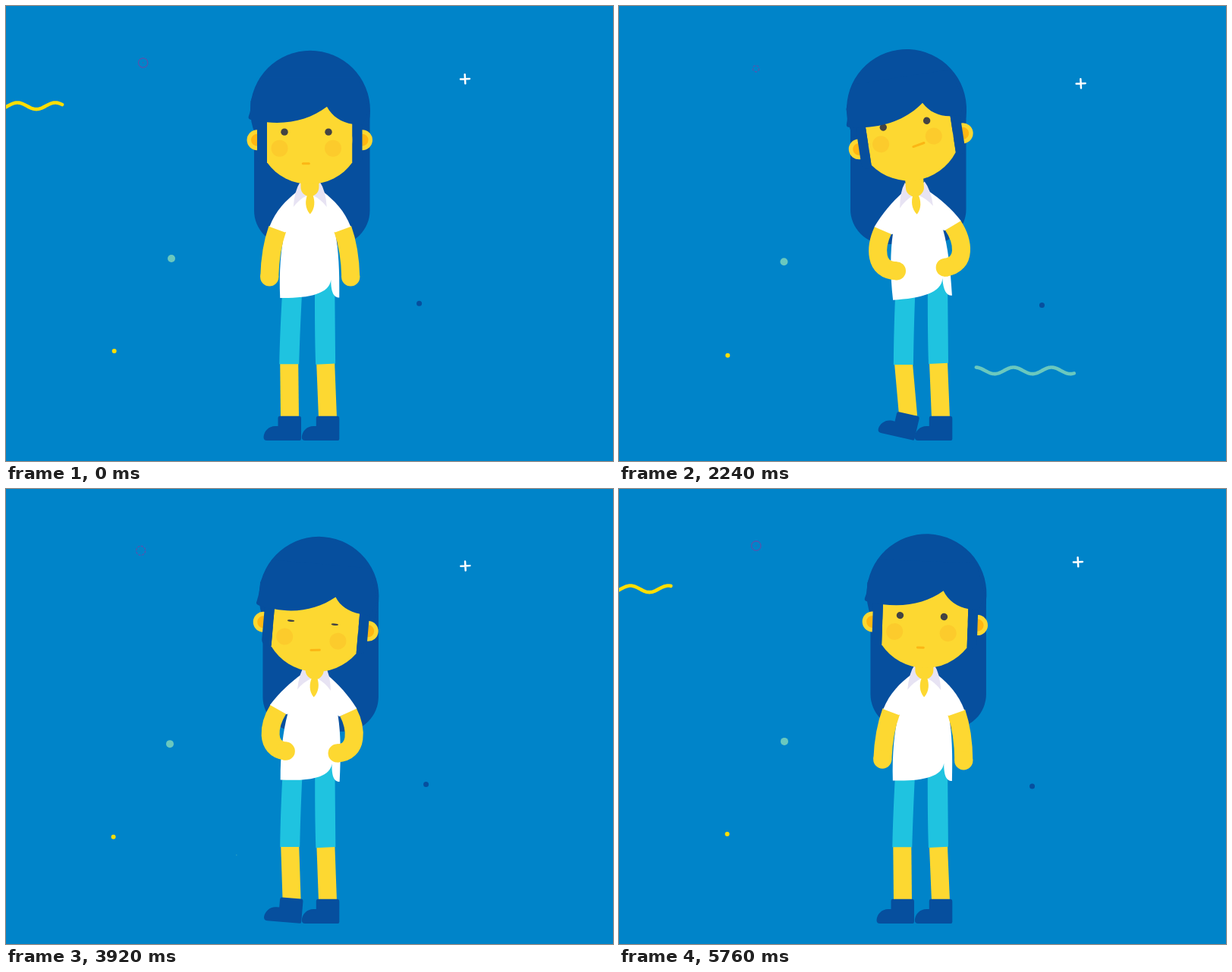
Animation, 800 px wide and 600 px high, one loop 5.8 s. Source, as an HTML page with a canvas:

```html
<!DOCTYPE html>
<html lang="en">
<head>
<meta charset="utf-8">
<title>Waiting girl</title>
<style>
html, body { margin: 0; width: 100%; height: 100%; overflow: hidden; background: #0084c9; }
canvas { display: block; width: 100vw; height: 100vh; }
</style>
</head>
<body>
<canvas id="stage" width="800" height="600"></canvas>
<script>
const ctx = document.getElementById('stage').getContext('2d');
const LOOP = 5800, STEP = 40;
const BLUE = '#0084c9', NAVY = '#064f9e', SKIN = '#fdd831', PANTS = '#1fc3e0',
      WHITE = '#fff', COLLAR = '#e7e3f3', ORANGE = '#ffb612', CHEEK = '#fccb2c',
      MOUTH = '#fbb615', EYE = '#434343', TEAL = '#6ac8be', YELLOW = '#ffde00', PURPLE = '#6a4aa8';

// ---- motion ----
const clamp = u => Math.min(1, Math.max(0, u));
const mix = (a, b, u) => a + (b - a) * u;
const inOut = u => u < .5 ? 4 * u ** 3 : 1 - 4 * (1 - u) ** 3;
const ramp = (t, start, length) => inOut(clamp((t - start) / length));
// Goes up to 1 and later back to 0
const pulse = (t, on, onLength, off, offLength) => ramp(t, on, onLength) - ramp(t, off, offLength);
const sway = (t, mid, amp, peak, period = LOOP) => mid + amp * Math.cos((t - peak) / period * 2 * Math.PI);

// Time runs from -550 to 5250, so the swing across the loop seam is one move
function poseAt(t) {
  const left = pulse(t, -500, 1000, 3540, 610);
  const stand = pulse(t, -500, 1000, 3560, 790);
  const lift = pulse(t, -500, 850, 3540, 460);
  const gaze = pulse(t, -500, 1100, 3540, 610);
  const sulk = pulse(t, 50, 650, 3540, 760);
  const tap = pulse(t, 1300, 650, 3560, 690);
  const look = pulse(t, 2350, 550, 3560, 690);
  const calm = pulse(t, -500, 600, 2350, 550);
  const lean = 1 - 2 * left, sink = 2 * (tap - look);
  return {
    left, lean,
    shift: 3.5 * stand - 1.5 - sink,
    headX: 401 + 20 * lean - sink,
    headY: 142 - 6 * lift,
    nod: 3.4 - 11.8 * gaze - 2 * tap + 12.3 * look,
    ears: 3.7 * sulk - 2.7 * look,
    fringe: 6 * (1 - calm),
    pout: .85 * sulk + .15 * tap,
    bend: 1 - pulse(t, -500, 440, 20, 480),
    hands: 3.5 * tap,
    foot: 13 * tap - 2 * look,
    lids: 1 - .73 * pulse(t, 3780, 120, 3940, 120)
  };
}

// ---- drawing helpers ----
function shape(d, color) {
  ctx.fillStyle = color;
  ctx.fill(new Path2D(d));
}
function line(d, color, width, cap = 'round') {
  ctx.strokeStyle = color;
  ctx.lineWidth = width;
  ctx.lineCap = cap;
  ctx.stroke(new Path2D(d));
}
function disc(x, y, rx, color, ry = rx) {
  ctx.fillStyle = color;
  ctx.beginPath();
  ctx.ellipse(x, y, rx, ry, 0, 0, 7);
  ctx.fill();
}
function box(x, y, w, h, r, color) {
  ctx.fillStyle = color;
  ctx.beginPath();
  ctx.roundRect(x, y, w, h, r);
  ctx.fill();
}
// Puts the pivot (px, py) of a part at (x, y) and turns it there
function group(draw, x, y, angle = 0, px = 0, py = 0) {
  ctx.save();
  ctx.translate(x, y);
  ctx.rotate(angle * Math.PI / 180);
  ctx.translate(-px, -py);
  draw();
  ctx.restore();
}
// Draws once as is and once mirrored about the body axis
function bothSides(draw) {
  draw();
  ctx.save();
  ctx.translate(801, 0);
  ctx.scale(-1, 1);
  draw();
  ctx.restore();
}

// ---- scene ----
function squiggle(from, to, mid, crest, color) {
  if (to < from) return;
  const y = x => mid - 4.3 * Math.cos((x - crest) * Math.PI / 25);
  let d = `M${from},${y(from)}`;
  for (let x = from + 1; x < to; x++) d += `L${x},${y(x)}`;
  line(d + `L${to},${y(to)}`, color, Math.min(4.6, to - from + 1));
}

function drawWaves(t) {
  const y = (t + 520) / 1840;
  if (y > 0 && y < 1) squiggle(.162 * t - 9, 198 - 204 * (1 - y) ** 1.5, 131.8, 15, YELLOW);

  const g = (t - 640) / 3290;
  if (g > 0 && g < 1) {
    const tip = 794 - 491 * g ** .58;
    const length = 129 * (1 - clamp((t - 2240) / 1690)) ** 4;
    squiggle(tip, Math.min(794, tip + length), 480.8, 20, TEAL);
  }
}

function drawDecor(t) {
  drawWaves(t);
  disc(sway(t, 217.3, 1.3, 900), sway(t, 335.3, 2.4, 2800), 5, TEAL);
  disc(sway(t, 142.6, 1.1, 1400), sway(t, 458, 3.1, 2700), 3, YELLOW);
  disc(sway(t, 551.5, 7, 2750), sway(t, 392.3, 3.2, 1500), 3.5, NAVY);
  group(() => line('M-6,0H6M0,-6V6', WHITE, 2.5), sway(t, 606.4, 2.3, 2050), sway(t, 99.7, 3.5, 2950), -3);

  group(() => {
    ctx.globalAlpha = .8;
    ctx.setLineDash([3.2, sway(t, 1, 1, 2900)]);
    const r = sway(t, 5.4, 1.3, 4900);
    line(`M${r},0A${r},${r} 0 1 1 ${-r},0A${r},${r} 0 1 1 ${r},0`, PURPLE, 1.3, 'butt');
    if (Math.abs(t) < 200) disc(0, 0, .8, PURPLE);
  }, sway(t, 179.3, 1.7, 2600, LOOP / 2), sway(t, 79.3, 4.4, 2900));
}

const BOOT = 'M361,540.7H386Q389,540.7 389,544V571Q389,573 387,573H344Q339.5,573 339.5,568.5' +
             'C340,561 346,554 355,554H358.5V543.5Q358.5,540.7 361,540.7Z';

function drawLegs(p) {
  const hip = p.shift * .5;
  const kneeL = 373.2 + p.foot * .16 + p.lean * .4, kneeR = 421 + hip;
  const cuffL = 471.6 + 1.4 * p.left, cuffR = 473.5 - 1.5 * p.left;
  const turn = p.foot * Math.PI / 180, c = Math.cos(turn), s = Math.sin(turn);
  const ankleX = 389 - 15 * c + 30 * s, ankleY = 573 - 15 * s - 30 * c;

  shape(`M${kneeL - 12},470H${kneeL + 12}L${ankleX + 12},${ankleY}H${ankleX - 12}Z`, SKIN);
  shape(`M${kneeR - 12},470H${kneeR + 12}L436,543H412Z`, SKIN);
  const mid = mix(363.5, kneeL - 14, .6);
  shape(`M${365 + hip},360Q${mid},430 ${kneeL - 13},${cuffL}H${kneeL + 13}` +
        `Q${mid + 26.5},425 ${391 + hip},360Z`, PANTS);
  shape(`M${407 + hip},355Q${406.5 + hip},430 ${kneeR - 13},${cuffR}L${kneeR + 13},${cuffR - 1.2}` +
        `Q${433.5 + hip},420 ${433 + hip},355Z`, PANTS);

  group(() => shape(BOOT, NAVY), 389, 573, p.foot, 389, 573);
  group(() => shape(BOOT, NAVY), 50.3, 0);
}

function drawArm(p) {
  const at = (straight, bent) => mix(straight, bent, p.bend);
  const handX = at(347, 365 + p.hands), handY = at(357.5, 347);
  line(`M${at(357.5, 354.5)},${at(294, 292)}C${at(350, 342.3)},${at(315, 313.8)} ` +
       `${at(347.5, 338.9)},${at(335, 344.6)} ${handX},${handY}`, SKIN, 24, 'butt');
  disc(handX, handY, 12.1, SKIN);
  shape(`M383,245C369,256 355,270 ${at(347, 343.3)},${at(291, 287)}` +
        `L${at(367.5, 365.8)},298.5L388,285Z`, WHITE);
}

function drawTorso(p) {
  shape('M383,245L367,298C362,320 359.5,350 361,385C398,385.5 426,380 428,361' +
        'C428,378 432,384.5 439,384.5C439.5,350 438,320 433.5,298L418,245L413,238H388Z', WHITE);
  bothSides(() => drawArm(p));
  bothSides(() => shape('M387.5,232Q380,243 378.5,265Q386,255 397,249.5L392,236Z', COLLAR));
  shape('M400.5,274.5C393.5,267 394,256 397,249H404C407,256 407.5,267 400.5,274.5Z', SKIN);
  line('M400.2,222V239', SKIN, 24);
}

function drawFace(p) {
  for (const x of [360.5, 431]) disc(x, 189, 11, CHEEK);
  for (const x of [367, 425]) disc(x, 167.5, 4.7, EYE, 4.7 * p.lids);
  const half = 4 + 3.5 * p.pout;
  group(() => line(`M${-half},0H${half}`, MOUTH, 3),
        395.3 + 14.3 * p.pout, 209 - 11.7 * p.pout, -11 * p.pout);
}

function drawHead(p) {
  disc(401, 138, 79, NAVY);
  for (const x of [331, 469.5]) {
    disc(x, 177 + p.ears, 13.5, SKIN);
    disc(x, 177 + p.ears, 8, ORANGE);
  }

  const jaw = 207 + p.nod * .3;
  shape(`M344,128H456.5V${jaw}A69.5,69.5 0 0 1 344,${jaw}Z`, SKIN);
  box(331, 140, 13, 68, [0, 0, 0, 7], NAVY);
  box(456.5, 140, 13, 68, [0, 0, 7, 0], NAVY);
  group(() => drawFace(p), 0, p.nod);

  const q = p.fringe, tip = 146 + q, side = 153.5 + q;
  shape(`M322.3,126Q323,138 320,${tip - 1}Q318.5,${tip + 3} 322,${tip + 4}Q331,${side} 344,${side}` +
        `C375,${side + 3} 402,${149 + q * .8} 423,${133 + q * .6}C430,${146 + q * .4} 442,154 457,156` +
        'L470,157L478,138L465,95H335Z', NAVY);
}

function draw(t) {
  const p = poseAt(t);
  ctx.fillStyle = BLUE;
  ctx.fillRect(0, 0, 800, 600);
  drawDecor(t);
  box(p.headX - 74, p.headY, 152.5, 178, [0, 0, 46, 46], NAVY);
  drawLegs(p);
  group(() => drawTorso(p), 400 + p.shift, 384.5, 4.05 * p.lean, 400, 384.5);
  group(() => drawHead(p), p.headX, p.headY, 8.7 * p.lean, 401, 138);
}

const start = performance.now();
function tick() {
  const t = Math.floor((performance.now() - start) % LOOP / STEP) * STEP;
  draw(t >= 5250 ? t - LOOP : t);
  requestAnimationFrame(tick);
}
tick();
</script>
</body>
</html>
```
